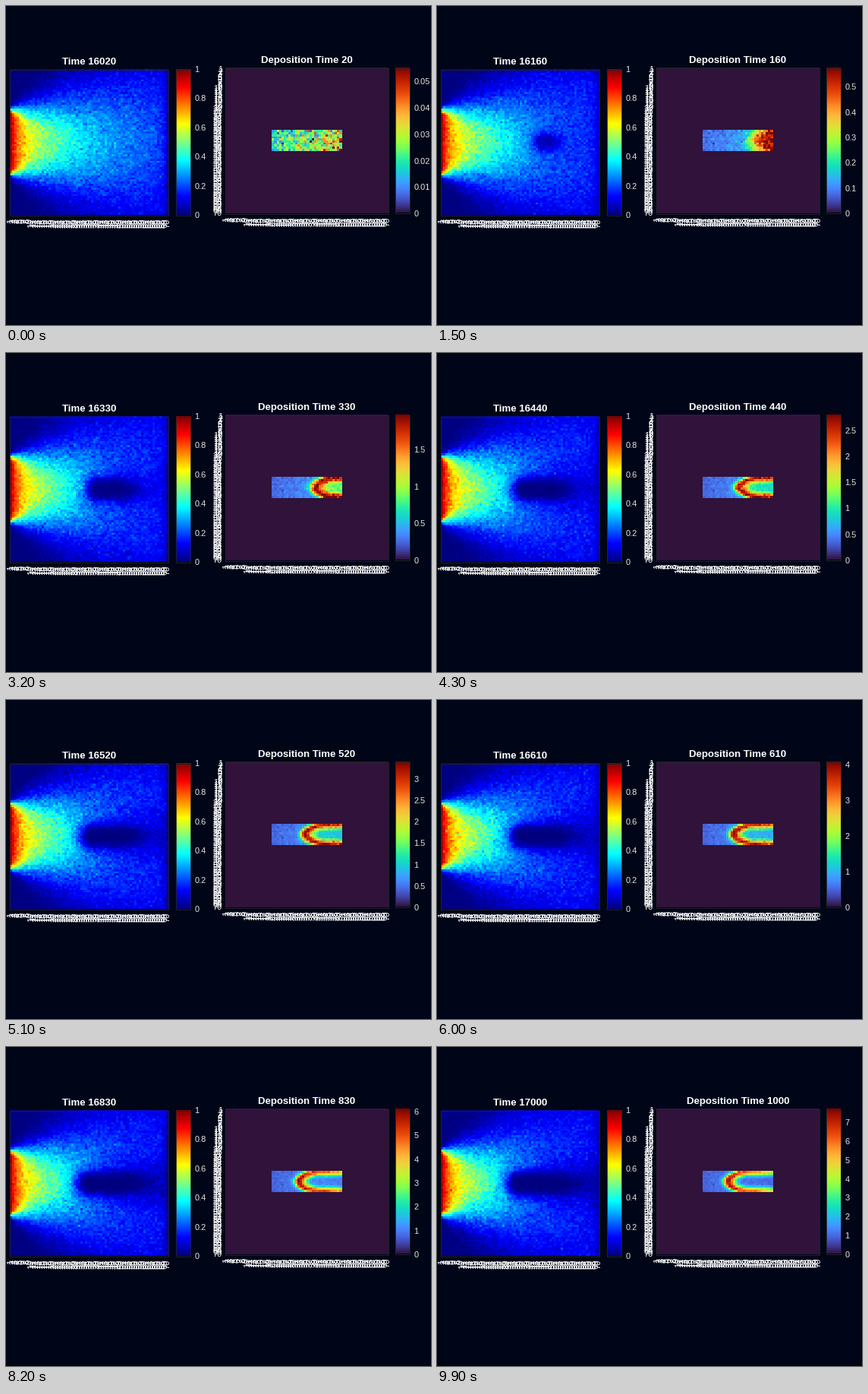
A matplotlib script for the animation above (10000 ms loop, 560 px wide and 420 px high).

```python
import numpy as np
import matplotlib.pyplot as plt
from matplotlib.animation import FuncAnimation
from matplotlib.colors import ListedColormap
from matplotlib.patches import Rectangle

W, H, DPI = 560, 420, 100
FRAMES, STEP_MS = 100, 100
N = 70
COLS, ROWS = slice(20, 50), slice(30, 40)
BG, INK, EDGE = "#000617", "#e4e4e4", "#262626"

v = np.linspace(0, 1, 256)
JET = ListedColormap(np.clip(
    1.5 - np.abs(4 * v[:, None] - np.array([3, 2, 1])), 0, 1))

row, col = np.mgrid[0:N, 0:N].astype(float)
grain = np.random.default_rng(4).standard_normal((10, 30))


def steady_flow():
    """Plume from an inlet on the left wall, widening downstream."""
    spread = 1.5 + .6 * col
    y = row + .5
    beam = (np.tanh((y - 19.5) / spread) - np.tanh((y - 50.5) / spread)) / 2
    level = .56 + .4 * np.exp(-col / 4.5)
    wall = 1 - .6 * np.exp((col - N + 1) / 1.5)
    return np.clip(level * beam * wall, .004, 1)


FLOW = steady_flow()


def concentration(t):
    """Plume with a hole that eats its way upstream."""
    depth = 1 - np.exp((20 - t) / 100)
    slow = 1 - np.exp((20 - t) / 300)
    r = 2.5 + 3.8 * depth ** 2
    nose = min(46, 25.5 + 2400 / t)
    dx = (np.maximum(nose + r - col, 0)
          + np.maximum(col - 46, 0) / (1 + 2.2 * slow ** 2))
    dy = row - 34.7
    hole = depth / (1 + (np.hypot(dx, dy) / r) ** 4)
    wake = .55 * slow * np.exp(-(dy / 18) ** 2) / (1 + np.exp((40 - col) / 6))
    c = FLOW * (1 - hole) * (1 - wake)
    noise = np.random.default_rng(t).standard_normal((N, N))
    return np.clip(c + .07 * np.sqrt(c * (1 - c)) * noise, 0, 1)


def peak_deposit(t):
    return np.interp(t, [20, 140, 330, 610, 1000],
                     [.055, .41, 1.96, 4.06, 7.68])


def deposition(t, peak):
    """Curved ridge moving left, relative to the largest deposit."""
    y, x = np.mgrid[0:10, 0:30].astype(float)
    front = min(26, 6.4 + 3840 / t)
    e = np.hypot(np.minimum(x - front - 9, 0) / 9, (y - 4.5) / 4.6) - 1
    tip = .95 - .6 * np.exp(-t / 60)
    slope = .3 - .7 * t / 1000
    ridge = tip + slope * np.clip((x - front) / (30 - front), 0, 1)
    ahead = .11 + 3 / t + .003 * x
    inner = min(.9, 150 / t) - .001 * x
    reach = min(2, .22 + (130 / t) ** 3)
    base = np.where(e > 0, ahead, inner)
    width = np.where(e > 0, reach, .38)
    d = base + (ridge - base) * np.exp(-(e / width) ** 2)
    d = np.clip(d + 1.1 * np.sqrt(d / t) * grain, 0, 1)
    full = np.zeros((N, N))
    full[ROWS, COLS] = np.round(d * peak / .005) * .005
    return full / peak


def tick_step(peak):
    steps = (m * 10.0 ** k for k in range(-3, 2) for m in (1, 2, 5))
    return next(s for s in steps if peak / s <= 8)


fig = plt.figure(figsize=(W / DPI, H / DPI), dpi=DPI, facecolor=BG)
ax = fig.add_axes([0, 0, 1, 1])


def label(x, y, s, size=11, **kw):
    kw = {"color": INK, "family": "Liberation Sans", **kw}
    return ax.text(x, y, s, fontsize=size * 72 / DPI, **kw)


def image(data, box, cmap):
    x0, y0, x1, y1 = box
    im = ax.imshow(data, cmap=cmap, vmin=0, vmax=1, aspect="auto",
                   extent=(x0, x1, y1, y0), interpolation="nearest")
    ax.add_patch(Rectangle((x0, y0), x1 - x0, y1 - y0, fill=False,
                           ec=EDGE, lw=.6))
    return im


def heatmap(box, cmap, title_y, row_labels):
    x0, y0, x1, y1 = box
    im = image(np.zeros((N, N)), box, cmap)
    for i in range(N):
        f = (i + .5) / N
        label(x0 + f * (x1 - x0), y1 + 4, str(i + 1), rotation=90,
              ha="center", va="top", color="white")
        if row_labels:
            label(x0 - 4, y0 + f * (y1 - y0) + 4, str(i + 1), ha="right",
                  color="white")
    title = label((x0 + x1) / 2, title_y, "", 13.2, weight="bold",
                  color="white", ha="center")
    return im, title


flow_im, flow_title = heatmap((5, 84, 214, 275.5), JET, 77, False)
dep_im, dep_title = heatmap((289, 82, 504, 273.5), "turbo", 75, True)

ramp = v[::-1, None]
image(ramp, (223.5, 84, 243, 275.5), JET)
image(ramp, (512.5, 82, 531.5, 272.5), "turbo")
for k in range(6):
    label(248.5, 279 - 192 * k / 5, f"{k / 5:g}")
ticks = [label(537.5, 0, "") for _ in range(9)]

ax.set_xlim(0, W)
ax.set_ylim(H, 0)
ax.axis("off")


def update(n):
    t = 10 * (max(n, 1) + 1)
    peak = peak_deposit(t)
    flow_im.set_data(concentration(t))
    dep_im.set_data(deposition(t, peak))
    flow_title.set_text(f"Time {16000 + t}")
    dep_title.set_text(f"Deposition Time {t}")
    step = tick_step(peak)
    for k, tick in enumerate(ticks):
        shown = k * step <= peak
        tick.set_visible(shown)
        if shown:
            tick.set_text(f"{k * step:g}")
            tick.set_y(277 - 191 * k * step / peak)
    return [flow_im, dep_im, flow_title, dep_title, *ticks]


anim = FuncAnimation(fig, update, frames=FRAMES, interval=STEP_MS,
                     repeat=True, repeat_delay=0)
plt.show()
```
